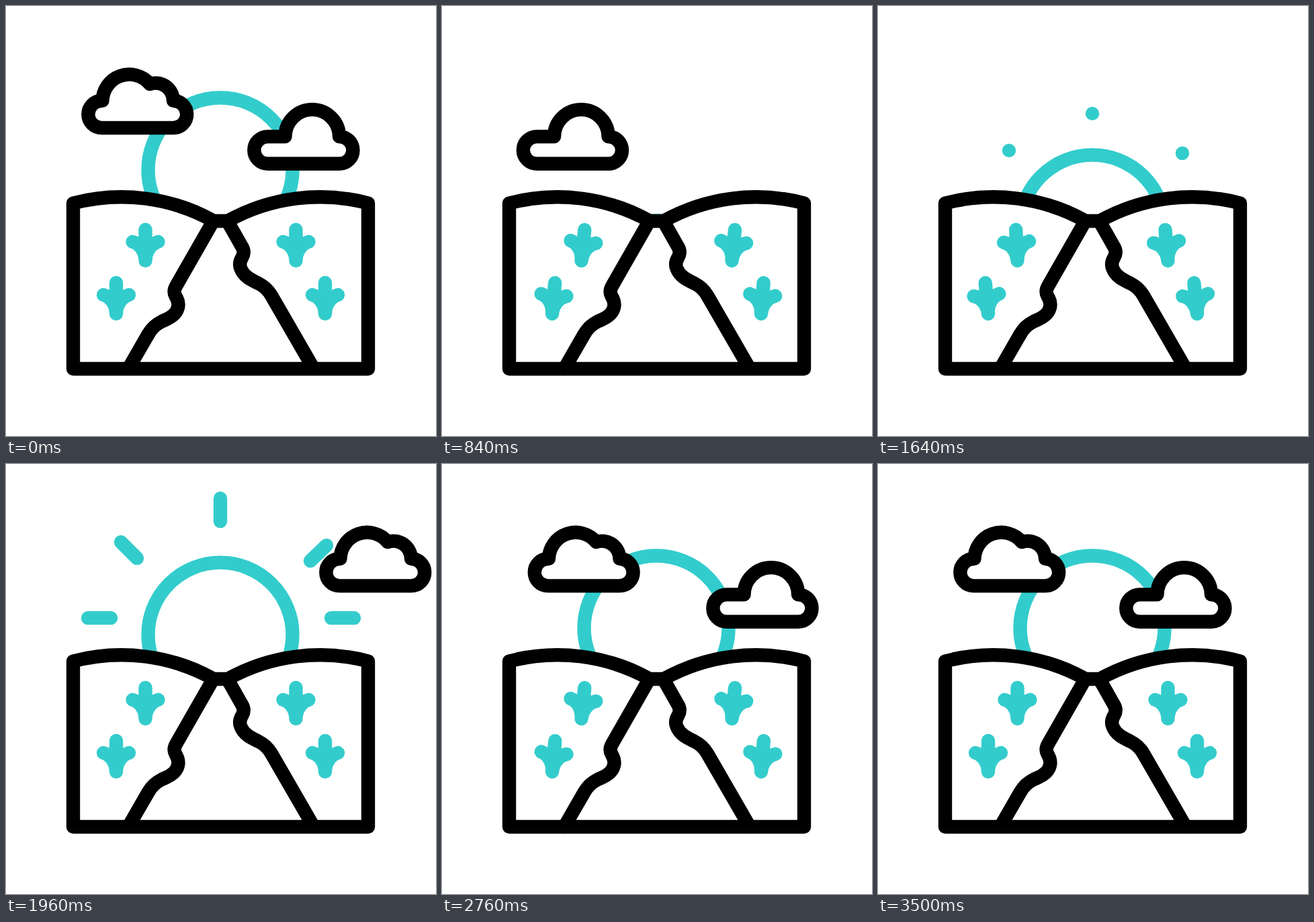
Write an HTML page that moves like this. It is 640 px wide and 640 px high and loops after 3600 ms.

```html
<!DOCTYPE html>
<html lang="en">
<head>
<meta charset="utf-8">
<title>Canyon sunrise</title>
<style>
  html, body { margin: 0; width: 100%; height: 100%; overflow: hidden; background: #fff; }
  svg { display: block; width: 100vw; height: 100vh; }
  .ink, .teal { stroke-width: 20.4; stroke-linecap: round; stroke-linejoin: round; }
  .ink { stroke: #000; fill: #fff; }
  .teal { stroke: #3cc; fill: none; }
</style>
</head>
<body>
<svg viewBox="0 0 640 640">
  <defs>
    <clipPath id="sky"><rect width="640" height="400"/></clipPath>
    <path id="plant" d="M0-46V0M-19-28C-8-25 0-13 0 0C0-13 8-25 19-28"/>
  </defs>
  <g clip-path="url(#sky)">
    <g id="sun" class="teal">
      <circle cx="319" cy="244" r="107.5"/>
      <g id="rays"></g>
    </g>
  </g>
  <g class="ink">
    <path d="M100 293.5A282 282 0 0 1 309 320H330A282 282 0 0 1 539 293.5V540H100Z"/>
    <path fill="none" d="M308.5 320L253 417Q248.500 425 252.500 432Q261.500 447 250 459C244 465 237 467 231 470Q219 476 212 488L182 540"/>
    <path fill="none" d="M329.500 320L351 358Q356 366 351.500 374Q346 383 349.500 391C354 403 366 408 376 413Q388 419 395 431L458 540"/>
  </g>
  <g id="plants" class="teal"></g>
  <path id="cloudA" class="ink" d="M143.500 141A40 40 0 0 1 214 116A26.500 26.500 0 0 1 249 141A20.200 20.200 0 0 1 249 181.400H142.500A20.200 20.200 0 0 1 142.500 141Z"/>
  <path id="cloudB" class="ink" d="M415.500 194.400A40.200 40.200 0 0 1 496 194.400A20.200 20.200 0 0 1 496.500 234.800H389.500A20.200 20.200 0 0 1 389.500 194.400Z"/>
</svg>
<script>
const LOOP = 3600;
const NS = 'http://www.w3.org/2000/svg';
const $ = id => document.getElementById(id);

function add(parent, tag, attrs) {
  const el = document.createElementNS(NS, tag);
  for (const k in attrs) el.setAttribute(k, attrs[k]);
  return parent.appendChild(el);
}

const ramp = (t, a, b) => Math.min(1, Math.max(0, (t - a) / (b - a)));
const quad = p => p < 0.5 ? 2 * p * p : 1 - 2 * (1 - p) * (1 - p);
const sine = p => (1 - Math.cos(Math.PI * p)) / 2;
const mix = (a, b, p) => a + (b - a) * p;

// Each ray runs from its inner end to its outer end.
const rays = [
  [319, 75, 319, 41],
  [195, 130, 171, 106],
  [453, 134, 477, 111],
  [156, 219, 122, 219],
  [484, 219, 518, 219]
].map(ends => ({ ends, el: add($('rays'), 'line', {}) }));

// Foot position and delay of each plant.
const plants = [
  [207.5, 379, 0],
  [431.5, 379, 80],
  [164, 458, 100],
  [475, 458, 130]
].map(([x, y, delay]) => ({ x, y, delay, el: add($('plants'), 'use', { href: '#plant' }) }));

function lean(t) {
  const up = sine(ramp(t, 490, 820));
  const over = sine(ramp(t, 820, 1470));
  const rest = sine(ramp(t, 1470, 1800));
  const again = sine(ramp(t, 2400, 2730));
  const settle = sine(ramp(t, 2730, 3370));
  return 6 * (up - 2 * over + rest + again - settle);
}

// Drifts off to the left, then glides in from the right.
function drift(t, start, rate, end) {
  if (t < 1400) return -Math.pow(Math.max(0, t - start) * rate, 2.2);
  return Math.pow(Math.max(0, end - t) * 0.00837, 2.6);
}

function moveX(el, x) {
  el.setAttribute('transform', `translate(${x.toFixed(2)} 0)`);
}

function draw(t) {
  const drop = 200 * (quad(ramp(t, 0, 1060)) - quad(ramp(t, 1070, 2130)));
  $('sun').setAttribute('transform', `translate(0 ${drop.toFixed(2)})`);

  const head = sine(ramp(t, 1640, 1900));
  const tail = sine(ramp(t, 2180, 2390));
  for (const { ends: [x1, y1, x2, y2], el } of rays) {
    el.setAttribute('x1', mix(x1, x2, tail));
    el.setAttribute('y1', mix(y1, y2, tail));
    el.setAttribute('x2', mix(x1, x2, head));
    el.setAttribute('y2', mix(y1, y2, head));
    el.setAttribute('visibility', head > tail ? 'visible' : 'hidden');
  }

  for (const { x, y, delay, el } of plants) {
    el.setAttribute('transform', `translate(${x} ${y}) rotate(${lean(t - delay).toFixed(3)})`);
  }

  moveX($('cloudA'), drift(t, 0, 0.0197, 3103));
  moveX($('cloudB'), drift(t, 180, 0.01856, 3225));
}

const began = performance.now();
function tick() {
  draw((performance.now() - began) % LOOP);
  requestAnimationFrame(tick);
}
tick();
</script>
</body>
</html>
```
